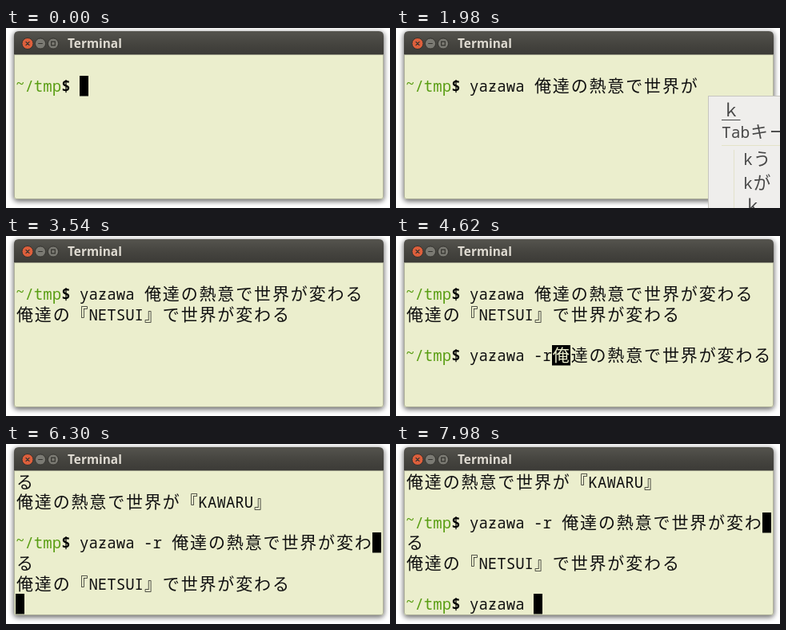
These frames come from a looping animation (480 by 226 pixels, 8 s). An HTML page:

```html
<!DOCTYPE html>
<html lang="ja">
<head>
<meta charset="utf-8">
<title>Terminal</title>
<style>
html, body { margin: 0; width: 100%; height: 100%; overflow: hidden; background: #fff; }
svg { display: block; width: 480px; height: 226px; }
.mono { font-family: "Noto Sans Mono", "DejaVu Sans Mono", monospace; }
.cjk { font-family: "Noto Sans CJK JP", "Noto Sans CJK", sans-serif; }
.title { font: 700 15.4px "Open Sans", "Noto Sans", sans-serif; fill: #dfdbd2; }
</style>
</head>
<body>
<svg viewBox="0 0 480 226" xmlns="http://www.w3.org/2000/svg">
  <defs>
    <linearGradient id="bar" x1="0" y1="0" x2="0" y2="1">
      <stop offset="0" stop-color="#55544e"/>
      <stop offset=".5" stop-color="#464540"/>
      <stop offset="1" stop-color="#3b3a36"/>
    </linearGradient>
    <filter id="blur" x="-10%" y="-10%" width="120%" height="120%">
      <feGaussianBlur stdDeviation="3"/>
    </filter>
  </defs>
  <rect x="9" y="5" width="464" height="213" rx="6" fill="#000" opacity=".55" filter="url(#blur)"/>
  <path d="M10 34V10q0-6 6-6H466q6 0 6 6V34Z" fill="url(#bar)"/>
  <path d="M10 33.5H472V212q0 3-3 3H13q-3 0-3-3Z" fill="#ebeecd"/>
  <path d="M10.5 34V212q0 2.5 2.5 2.5H469q2.5 0 2.5-2.5V34" fill="none" stroke="#8d8e7c" stroke-opacity=".6"/>
  <g stroke="#33322e" stroke-width="1">
    <circle cx="27" cy="19.5" r="7" fill="#dd5f3c"/>
    <circle cx="43" cy="19.5" r="6.6" fill="#7b7a73"/>
    <circle cx="59" cy="19.5" r="6.6" fill="#7b7a73"/>
    <path d="M24.6 17.1l4.8 4.8m0-4.8l-4.8 4.8M40.2 19.5h5.6M56.7 17.2h4.6v4.6h-4.6z" fill="none" stroke-width="1.2"/>
  </g>
  <text class="title" x="77" y="24.7">Terminal</text>
  <g id="screen"></g>
</svg>
<script>
const LOOP = 8000, BLINK = 530, COLS = 40, ROWS = 7;
const LEFT = 12, TOP = 34.5, CELL = 11.43, LINE = 25.65;
const PAPER = '#ebeecd', INK = '#111', GREEN = '#5a9e14';
const PROMPT = '~/tmp$ ';
const PHRASE = '俺達の熱意で世界が';
const PLAIN = 'yazawa ' + PHRASE + '変わる';
const RANDOM = 'yazawa -r ' + PHRASE + '変わる';
const NETSUI = '俺達の『NETSUI』で世界が変わる';
const KAWARU = PHRASE + '『KAWARU』';

const isWide = c => c > '\u00ff';
const span = c => isWide(c) ? 2 : 1;
const width = s => [...s].reduce((n, c) => n + span(c), 0);
const typed = (start, step, s) => [...s].map((c, i) => [start + i * step, 'key', c]);

const script = [
  ...typed(120, 110, 'yazawa '),
  [1020, 'ime', 'お', 'お願いします', 'おはよう', '俺'],
  [1140, 'ime', 'おｒ', PHRASE, '俺達の', '俺の'],
  [1200, 'ime', 'おれ', PHRASE, '俺達の', '俺の'],
  [1440, 'key', PHRASE],
  [1920, 'ime', 'ｋ', 'kう', 'kが', 'ｋ'],
  [2060, 'ime', 'か', '変わる', 'から', 'かな'],
  [2200, 'ime', 'かｗ', '変わる', '変わって', '代わり'],
  [2320, 'ime', 'かわ', '変わる', '変わって', '代わり'],
  [2640, 'key', '変わる'],
  [3000, 'enter'], [3490, 'print', NETSUI], [3570, 'ready'],
  [3960, 'recall', PLAIN],
  [4170, 'move', 0], [4320, 'move', 7],
  ...typed(4440, 110, '-r '),
  [4900, 'enter'], [5390, 'print', KAWARU], [5430, 'ready'],
  [5620, 'recall', RANDOM],
  [5800, 'enter'], [6270, 'print', NETSUI], [6325, 'ready'],
  ...typed(7200, 110, 'yazawa ')
];

const actions = {
  key(s, text) {
    s.cmd = s.cmd.slice(0, s.pos) + text + s.cmd.slice(s.pos);
    s.pos += text.length;
  },
  recall(s, text) { s.cmd = text; s.pos = text.length; },
  move(s, pos) { s.pos = pos; },
  ime(s, ...words) { s.ime = words; },
  enter(s) { s.out.push(PROMPT + s.cmd); s.busy = true; },
  print(s, text) { s.out.push(text); },
  ready(s) { s.out.push(''); s.cmd = ''; s.pos = 0; s.busy = false; }
};
const quiet = ['ime', 'print', 'ready'];

function stateAt(t) {
  const s = { out: [''], cmd: '', pos: 0, busy: false, ime: null, since: 0 };
  for (const [at, name, ...args] of script) {
    if (at > t) break;
    if (name !== 'ime') s.ime = null;
    actions[name](s, ...args);
    if (!quiet.includes(name)) s.since = at;
  }
  s.lit = Math.floor((t - s.since) / BLINK) % 2 === 0;
  return s;
}

// Breaks a line into screen rows; "gap" marks a cell left over by a wide character.
function wrap(text) {
  const rows = [{ text: '', gap: false }];
  let n = 0;
  for (const c of text) {
    if (n + span(c) > COLS) {
      rows[rows.length - 1].gap = n < COLS;
      rows.push({ text: '', gap: false });
      n = 0;
    }
    rows[rows.length - 1].text += c;
    n += span(c);
  }
  return rows;
}

// Sets text on a grid of cells, one element per script.
function grid(text, x, y, cell, fill, weight = 500) {
  const runs = { mono: [[], ''], cjk: [[], ''] };
  const size = { mono: cell / 0.6, cjk: cell * 1.84 };
  let marks = '', cx = x;
  for (const c of text) {
    const kind = isWide(c) ? 'cjk' : 'mono';
    if (c !== ' ') {
      runs[kind][0].push((cx + (isWide(c) ? cell * 0.08 : 0)).toFixed(2));
      runs[kind][1] += c;
    }
    if (c === 'z') marks += `<path d="M${cx + 3} ${y - 5.2}h5.6" stroke="${fill}" stroke-width="1.2"/>`;
    cx += cell * span(c);
  }
  return marks + Object.entries(runs).map(([kind, [xs, chars]]) => chars &&
    `<text class="${kind}" font-size="${size[kind]}" font-weight="${weight}" x="${xs.join(' ')}" y="${y}" fill="${fill}">${chars}</text>`
  ).join('');
}

const colX = col => LEFT + col * CELL;
const rowY = row => TOP + row * LINE;
const block = (col, row, n = 1) =>
  `<rect x="${Math.round(colX(col))}" y="${Math.round(rowY(row))}" width="${Math.round(CELL * n)}" height="25.5" fill="#000"/>`;

function drawRow({ text, gap }, row) {
  const y = rowY(row) + 20;
  let svg = gap ? block(COLS - 1, row) : '';
  if (text.startsWith(PROMPT)) {
    svg += grid('~', LEFT, y - 3.5, CELL, GREEN) + grid('/tmp', colX(1), y, CELL, GREEN);
    svg += grid('$', colX(5), y, CELL, '#000', 700);
    return svg + grid(text.slice(PROMPT.length), colX(PROMPT.length), y, CELL, INK);
  }
  return svg + grid(text, LEFT, y, CELL, INK);
}

function drawPopup([reading, ...words], x, y) {
  const cell = 11.75, ink = '#484848';
  const w = Math.max(15, ...words.map(width)) * cell + 58;
  const line = (d, c) => `<path d="${d}" stroke="${c}" fill="none"/>`;
  const label = (text, dx, dy) => grid(text, x + dx, y + dy, cell, ink, 400);
  return `<rect x="${x + 1}" y="${y + 1}" width="${w + 1}" height="200" fill="#000" opacity=".18"/>` +
    `<rect x="${x + .5}" y="${y + .5}" width="${w - 1}" height="200" fill="#efeeec" stroke="#c6c5bf"/>` +
    label(reading, 17, 25.5) +
    line(`M${x + 17} ${y + 30.5}h${width(reading) * cell}`, ink) +
    label('Tabキーで選択', 17, 52.5) +
    line(`M${x + 17} ${y + 62.5}h${w - 26}`, '#e4e3c8') +
    line(`M${x + 32.5} ${y + 68}v140`, '#e2e1cc') +
    words.map((word, i) => label(word, 44, 87 + i * 29.5)).join('');
}

function draw(s) {
  const rows = s.out.flatMap(wrap);
  let cursorRow = rows.length, col = 0, under = '';
  if (s.busy) {
    rows.push({ text: '', gap: false });
  } else {
    const before = wrap(PROMPT + s.cmd.slice(0, s.pos));
    cursorRow += before.length - 1;
    col = width(before[before.length - 1].text);
    under = s.cmd[s.pos] || '';
    rows.push(...wrap(PROMPT + s.cmd));
  }
  const scroll = Math.max(0, rows.length - ROWS);
  const row = cursorRow - scroll;
  let svg = rows.slice(scroll).map(drawRow).join('');
  if (s.lit) {
    svg += block(col, row, under ? span(under) : 1);
    if (under) svg += grid(under, colX(col), rowY(row) + 20, CELL, PAPER);
  }
  if (s.ime) svg += drawPopup(s.ime, Math.round(colX(col) + 12), Math.floor(rowY(row + 1)));
  return svg;
}

const screen = document.getElementById('screen');
const start = performance.now();
let shown = '';
function tick() {
  const svg = draw(stateAt((performance.now() - start) % LOOP));
  if (svg !== shown) screen.innerHTML = shown = svg;
  requestAnimationFrame(tick);
}
tick();
</script>
</body>
</html>
```
